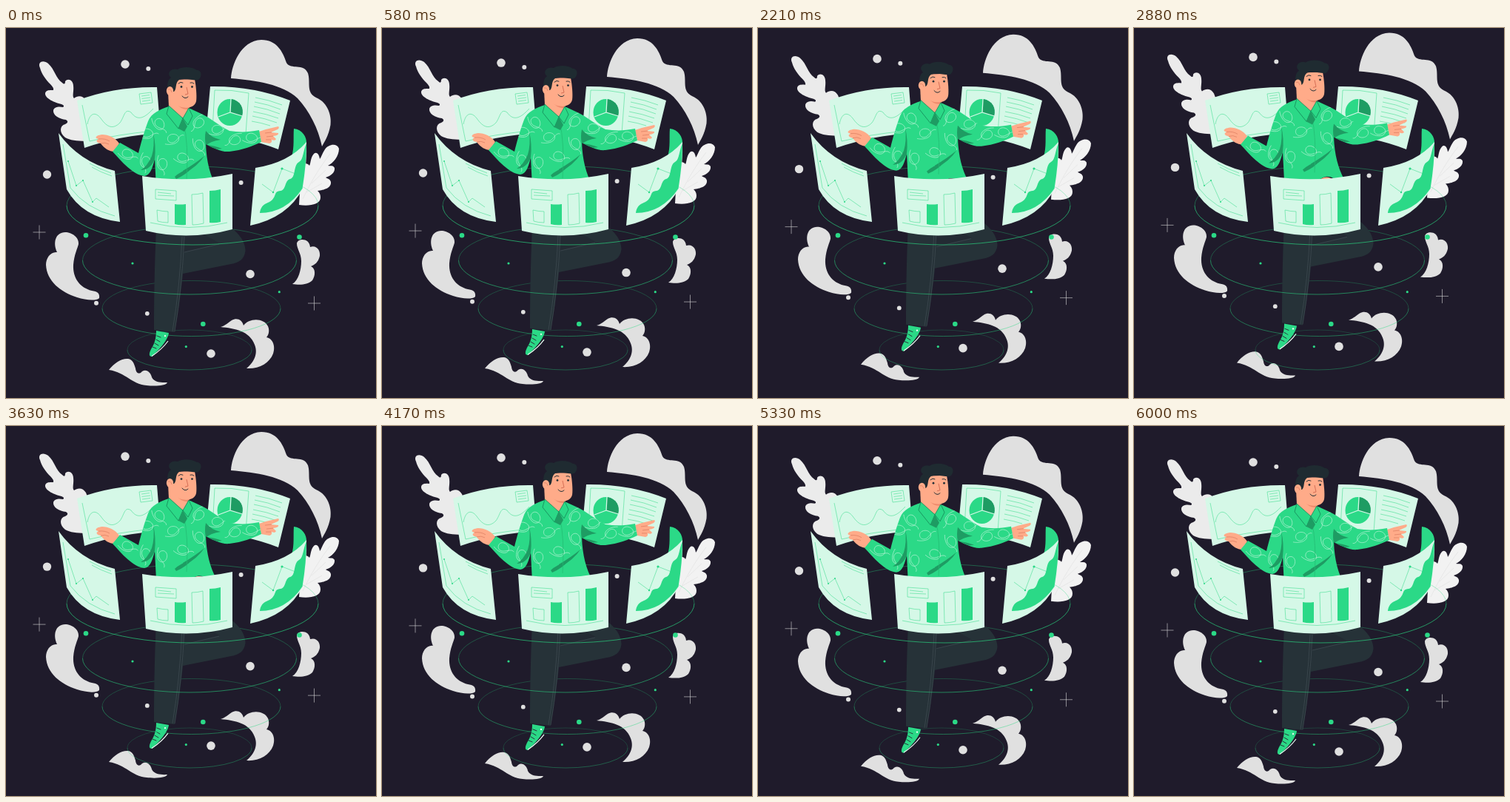
Animation of 500 by 500 pixels, one loop 6.04 s. Source, as an HTML page:

```html
<!DOCTYPE html>
<html>
<head>
<meta charset="utf-8">
<style>
html, body { margin: 0; width: 100%; height: 100%; overflow: hidden; background: #1f1b2b }
svg { display: block; width: 100vw; height: 100vh }
.line { fill: none; stroke: #2bd983; stroke-width: .5 }
.panel { fill: #d5f8e7 }
.green { fill: #2bd987 }
.dark { fill: #1e9c63 }
.cloud { fill: #e0e0e0 }
.skin { fill: #ffab89 }
.ink { fill: #263238 }
.hair { fill: #1f2b31 }
.pen { fill: none; stroke: #263238; stroke-width: 1; stroke-linecap: round }
.swirl { fill: none; stroke: #c3f5dc; stroke-width: .7 }
.ring { fill: none; stroke: #2bd983; stroke-width: .7 }
</style>
</head>
<body>
<svg viewBox="0 0 500 500">
<defs>
  <path id="shirt" d="M220 106C208 110 196 115 192 126C186 142 182 157 179 169L154 155L144 167C156 180 172 199 187 200C195 199 198 189 201 177L203 216L250 216C254 211 262 208 270 213L284 214C276 199 271 181 270 157C282 163 291 168 302 167C320 165 332 160 345 154L342 138C327 141 315 141 302 139C288 132 276 121 262 115L249 109Z"/>
  <path id="swirl" d="M-13 8C-5 10 9 8 9-1C8-10-8-10-9-1C-9 6-2 8 3 4C8 0 11-8 17-6"/>
  <clipPath id="shirtClip"><use href="#shirt"/></clipPath>
</defs>

<g class="float">
  <g class="cloud">
    <path d="M304 68C305 50 317 17 345 16C366 16 374 32 379 47C385 57 402 47 408 61C412 74 405 87 419 94C436 101 440 120 438.500 131C436 146 430 154 427 160C422 136 410 112 394 95C374 76 338 71 304 68Z"/>
    <path d="M98 292C99 283 89 276 80 276C67 276 63 290 69 303C60 302 54 311 54 320C55 342 74 357 96 364C108 368 122 369 126 365C127 358 123 356 116 355C100 351 90 338 91 320C92 306 97 297 98 292Z"/>
    <path d="M393 291C394 284 410 283 411 296C420 293 425 301 424 308C422 317 417 320 412 322C419 325 418 335 414 341C407 348 395 347 387 346C395 341 399 327 399 315C399 304 393 299 393 291Z"/>
    <path d="M290 404C297 402 300 398 305 395C312 391 319 394 321 402C328 392 348 391 354 403C357 410 354 416 352 418C362 420 364 432 361 440C356 453 342 461 325 460C335 452 341 440 336 428C329 409 309 406 290 404Z"/>
    <path d="M139 462C147 452 157 446 165 447C171 448 173 453 175 460C176 468 181 468 184 464C190 460 196 466 197 472C201 480 212 479 218 479C216 484 200 484 190 483C169 481 163 466 139 462Z"/>
    <circle cx="161" cy="49" r="5.800"/><circle cx="192.300" cy="55" r="3"/>
    <circle cx="55.500" cy="198" r="5.700"/><circle cx="317.600" cy="209" r="3"/>
    <circle cx="330" cy="332.500" r="5.800"/><circle cx="190.800" cy="385.800" r="2.900"/>
    <circle cx="122" cy="371.700" r="3"/><circle cx="277" cy="440" r="5.800"/>
  </g>
  <path fill="#ebebeb" d="M46 54C42 45 51 43 57 48C66 56 67 68 76 74Q80 78 80 72C84 67 91 71 91 78C92 86 89 92 92 95C97 91 104 91 108 98L128 152C109 153 90 154 80 148C72 142 72 132 80 130Q86 127 81 124C72 123 63 118 64 111C66 106 72 106 77 107Q80 105 75 103C66 101 52 95 53 88C54 83 61 84 64 84Q65 81 60 76C54 70 48 62 46 54Z"/>
  <path fill="#f2f2f2" d="M396 239C409 241 425 239 425 229C425 224 423 222 421 220C430 219 440 216 439 208C438 204 435 204 432 202C439 200 445 195 444 189C442 185 438 187 435 186C442 183 450 173 450 163C447 155 436 157 431 164C427 170 426 175 424 177C423 169 419 167 416 170C411 176 412 183 410 186C407 182 403 182 399 188Z"/>
  <path d="M438 170C424 188 412 208 401 231M413 210L432 192M406 222L427 210" fill="none" stroke="#e0e0e0" stroke-width=".6"/>
  <path d="M45 266.500V285.500M36.500 276H53.500M416.500 362.500V381.500M408 372H425" fill="none" stroke="#d8d8d8" stroke-width=".6"/>
</g>

<g class="ring" id="back" opacity=".55"></g>

<path class="panel" d="M96 98Q146 79 204 80L209 142Q155 145 106 162Z"/>
<g class="line">
  <path d="M103 104L113 153Q150 144 199 139"/>
  <path d="M110 130C113 114 121 113 128 122C137 135 145 137 154 128C160 120 160 108 169 114C178 127 188 121 199 109"/>
  <path d="M180 89L196 87L198 101L182 103ZM183 92L194 90.500M183.500 95.500L195 94M184 99L195 97.500"/>
</g>
<path class="panel" d="M276 79Q334 78 384 98L368 164Q322 146 270 144Z"/>
<g class="line">
  <path d="M282 84Q305 83 328 88L324 143L279 138Z"/>
  <path d="M337 94Q355 97 373 104M336 100Q354 103 371 110M335 106Q353 109 370 116M334 113Q352 116 368 122M333 119Q350 122 366 128M332 126Q345 128 357 132"/>
</g>
<ellipse class="green" cx="302.500" cy="114" rx="17" ry="18"/>
<path class="dark" d="M303 114L304 96C317 98 322 108 319 119Z"/>
<path d="M304 96L303 114L319.500 119M303 114L287 120" fill="none" stroke="#d5f8e7" stroke-width="1.300"/>

<g class="float">
  <path class="ink" d="M204 250L290 262C310 270 324 287 323.500 301C322 313 315 317 304 319L239 332C236 361 232 389 228 411L200 408C200 360 201 305 204 250Z"/>
  <path fill="#232b33" d="M242 280L264 277L289 291L240 303Z"/>
  <path d="M241 282Q238 350 228 410M238 282Q235 350 225 410M241 303L288 292" fill="none" stroke="#465158" stroke-width=".6"/>
  <path class="green" d="M203 409L220 412C219 422 205 437 197 444C193 444 193 440 196 434C201 426 203 419 203 409Z"/>
  <path d="M219 423Q211 434 197 443.500" fill="none" stroke="#effff7" stroke-width="1.200"/>
  <path class="pen" stroke-width=".8" d="M204 416L209 418M203 421L208 424M201 426L206 429M198 431L203 433"/>
  <circle cx="215" cy="416" r="1.200" fill="#effff7"/>

  <path class="skin" d="M153 156C148 148 138 144 130 144C121 145 119 149 125 150C121 152 122 155 128 156C133 163 140 167 146 167Z"/>
  <path d="M125 150Q134 149 140 153M128 156Q134 154 139 157" fill="none" stroke="#d97b60" stroke-width=".7"/>
  <path class="skin" d="M342 140L351 137L368 133Q370 135 367 137L358 141L368 142Q369 145 361 146L365 150Q364 153 359 151Q360 155 356 156L345 154Z"/>
  <path d="M350 142L359 141M352 147L361 146M351 151L358 151" fill="none" stroke="#d97b60" stroke-width=".7"/>
  <path class="skin" d="M250 215Q260 207 270 215Z"/>
  <use href="#shirt" class="green"/>
  <g clip-path="url(#shirtClip)">
    <g class="swirl" id="swirls"></g>
    <path class="dark" d="M201 177Q203 159 199 142Q201 160 197 173Q191 187 182 192Q195 192 201 177ZM228 201Q235 194 252 188Q244 198 230 204ZM239 193Q256 183 268 173Q260 186 239 198ZM270 158Q282 159 292 163Q280 165 270 160ZM270 159Q268 148 270 139Q277 148 290 151Q276 153 270 159Z"/>
    <path d="M240 128Q247 157 244 205" fill="none" stroke="#23b972" stroke-width=".7"/>
  </g>
  <path class="skin" d="M219 86L220 106C225 114 234 121 239 121C244 119 247 113 247 105Z"/>
  <path fill="#ed8a6c" d="M230 101Q239 109 248 107L247 110Q236 111 230 101Z"/>
  <path class="green" stroke="#168657" stroke-width=".8" d="M220 105L239 122L233 136L217 116ZM247 108L252 119L246 131L239 122Z"/>
  <path class="dark" d="M239 122L245 133L241 140L233 136Z"/>
  <path class="skin" d="M224 70L255 69C257 80 258 92 257 99C255 107 246 109 237 107C230 105 224 99 224 90Z"/>
  <path class="hair" d="M219 86C217 75 219 70 223 67C216 62 223 53 232 56C240 51 252 53 258 57C265 57 265 66 260 70C255 72 243 67 234 70C228 74 231 83 227 86Z"/>
  <ellipse class="skin" cx="221.500" cy="85" rx="4.700" ry="6"/>
  <path d="M219 83Q223 82 224 87" fill="none" stroke="#d97b60" stroke-width=".7"/>
  <path class="pen" d="M233 75Q236 72 239 74M249 74Q252 73 254 75M238 92Q242 97 246 93"/>
  <path d="M244 80L246 89L242 90" fill="none" stroke="#c9604a" stroke-width=".8"/>
  <circle class="ink" cx="237" cy="79.500" r="1.400"/><circle class="ink" cx="251.500" cy="79.500" r="1.400"/>
</g>

<g class="ring" id="front"></g>

<path class="panel" d="M71 142Q99 181 147 193L154 262Q103 256 82 218Z"/>
<g class="line">
  <path d="M77 157L87 216Q108 244 147 254"/>
  <path d="M84 180L95 213L104 206L117 235L122 230L139 242"/>
  <path d="M113 183Q127 191 142 196M116 188Q128 195 143 200"/>
</g>
<g class="green"><circle cx="84" cy="180" r="1"/><circle cx="95" cy="213" r="1"/><circle cx="104" cy="206" r="1"/><circle cx="117" cy="235" r="1"/></g>

<path class="green" d="M389 136C400 137 407 147 406 157Q399 168 386 174C390 161 388 147 389 136Z"/>
<path class="panel" d="M337 189Q382 182 406 154Q407 180 401 217Q381 256 330 267Z"/>
<path class="green" d="M343 250C345 236 354 238 360 232C366 225 362 221 371 220C379 219 376 206 384 204C392 202 388 185 396 181C402 178 401 167 406 156Q406 183 400.500 217Q378 250 343 250Z"/>
<path class="line" d="M346 211L361 222L373 190L391 197L404 169"/>
<g class="green"><circle cx="361" cy="222" r="1.200"/><circle cx="373" cy="190" r="1.600"/><circle cx="391" cy="197" r="1.200"/></g>

<path class="panel" d="M184 200Q246 210 306 197L306 272Q247 288 189 274Z"/>
<g class="line">
  <path d="M195 263Q247 276 299 263M202 218L230 220L230 233L202 231ZM205 222L223 224M205 226L227 227"/>
  <path d="M204 246Q212 248 219 248L219 263Q211 263 205 261ZM251 225Q259 225 266 223L267 264Q259 266 252 266Z"/>
</g>
<path class="green" d="M228 238Q235 239 243 238L243 266Q235 267 228 265ZM275 220Q283 220 290 218L290 262Q282 264 275 263Z"/>

<g class="green">
  <circle cx="108" cy="280.300" r="3.300"/><circle cx="396.500" cy="282.500" r="3.300"/>
  <circle cx="266.300" cy="400" r="3.300"/><circle cx="171" cy="318" r="1.600"/>
  <circle cx="369.300" cy="356.700" r="1.600"/><circle cx="243.300" cy="430.600" r="1.600"/>
</g>
</svg>
<script>
const el = id => document.getElementById(id);

// Each ring: centre x, centre y, radius x, radius y
const rings = [[252, 240, 170, 53], [248, 314, 144.5, 46], [250.5, 379, 120.5, 37.5], [248, 435, 84, 27]];
const arcs = sweep => rings.map(([x, y, rx, ry], i) =>
  `<path d="M${x - rx} ${y}A${rx} ${ry} 0 0 ${sweep} ${x + rx} ${y}" opacity="${.95 - i * .15}"/>`).join('');
el('back').innerHTML = arcs(1);
el('front').innerHTML = arcs(0);

// Shirt pattern: x, y, rotation
const swirls = [[226, 150, 0], [207, 130, 70], [191, 143, 20], [211, 184, 100], [239, 176, 30],
  [260, 128, 150], [261, 159, 80], [286, 138, 10], [309, 151, 170], [332, 149, 20],
  [164, 171, 40], [188, 181, 110]];
el('swirls').innerHTML = swirls.map(([x, y, r]) =>
  `<use href="#swirl" transform="translate(${x} ${y}) rotate(${r}) scale(.85)"/>`).join('');

const floating = document.querySelectorAll('.float');
const start = performance.now();
function draw(now) {
  const t = Math.min(Math.max(0, now - start) % 6040, 6000);
  const lift = 10 * (1 - Math.abs(t / 3000 - 1));
  floating.forEach(g => g.setAttribute('transform', `translate(0 ${-lift})`));
  requestAnimationFrame(draw);
}
draw(start);
</script>
</body>
</html>
```
